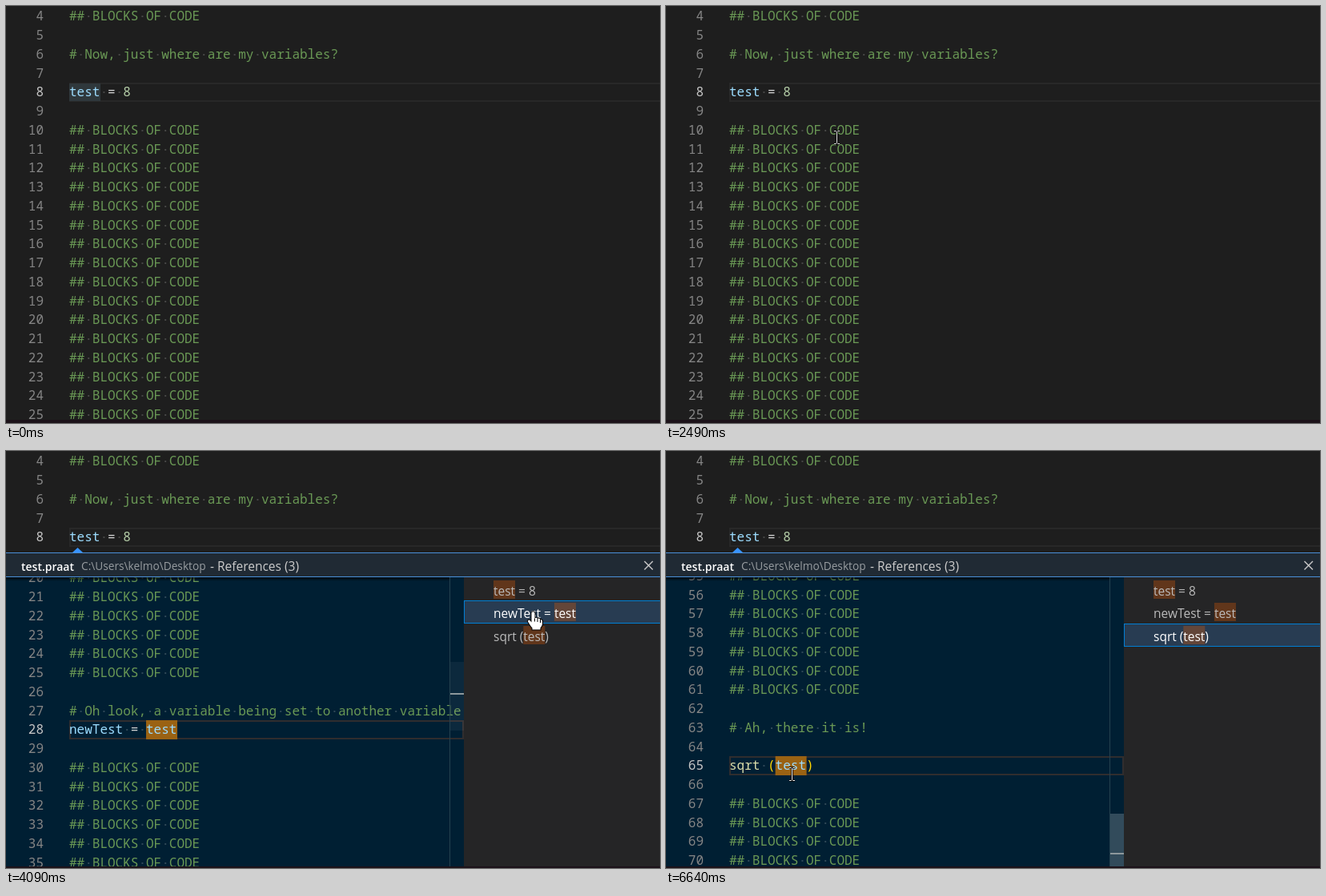
Recreate the animation shown at these times as an HTML page with a canvas. Size 817 by 522 pixels, loop 7.65 s.

```html
<!DOCTYPE html>
<html lang="en">
<head>
<meta charset="utf-8">
<title>Peek references</title>
<style>
html, body { margin: 0; width: 100%; height: 100%; overflow: hidden; background: #1e1e1e; }
canvas { display: block; }
</style>
</head>
<body>
<canvas id="stage" width="817" height="522"></canvas>
<script>
const ctx = document.getElementById('stage').getContext('2d');
const W = 817, H = 522, LOOP = 7650;
const LINE = 23.75, CHAR = 9.6, LEFT = 79;
const MONO = '16px "Noto Sans Mono", monospace';
const UI = '"Open Sans", "Noto Sans", sans-serif';
const GREEN = '#6a9955', BLUE = '#9cdcfe', GREY = '#d4d4d4', GOLD = '#ffd700';

const rect = (color, x, y, w, h) => { ctx.fillStyle = color; ctx.fillRect(x, y, w, h); };

function text(str, x, y, color, font, align = 'left') {
  ctx.font = font;
  ctx.fillStyle = color;
  ctx.textAlign = align;
  ctx.fillText(str, x, y);
}

function line(color, width, ...pts) {
  ctx.strokeStyle = color;
  ctx.lineWidth = width;
  ctx.beginPath();
  for (let i = 0; i < pts.length; i += 2) ctx.lineTo(pts[i], pts[i + 1]);
  ctx.stroke();
}

// ---- code document: each line is a list of [text, colour] tokens ----
const special = {
  6: [['# Now, just where are my variables?', GREEN]],
  8: [['test', BLUE], [' = ', GREY], ['8', '#b5cea8']],
  27: [['# Oh look, a variable being set to another variable', GREEN]],
  28: [['newTest', BLUE], [' = ', GREY], ['test', BLUE]],
  63: [['# Ah, there it is!', GREEN]],
  65: [['sqrt', '#dcdcaa'], [' ', GREY], ['(', GOLD], ['test', BLUE], [')', GOLD]]
};
const blank = [5, 7, 9, 26, 29, 62, 64, 66];
const block = [['## BLOCKS OF CODE', GREEN]];
const tokens = n => special[n] || (blank.includes(n) ? [] : block);

function codeLine(n, mid, active) {
  const base = Math.round(mid + 5.75);
  text(n, 47, base, active ? '#c6c6c6' : '#858585', MONO, 'right');
  let x = LEFT;
  for (const [str, color] of tokens(n)) {
    text(str, x, base, color, MONO);
    [...str].forEach((c, i) => {
      if (c === ' ') rect('rgba(227,228,226,.2)', x + i * CHAR + 4, base - 6, 2, 2);
    });
    x += str.length * CHAR;
  }
}

function currentLine(mid, right, color) {
  const y = Math.round(mid - 11.5);
  ctx.strokeStyle = color;
  ctx.lineWidth = 2;
  ctx.strokeRect(LEFT + 1, y + 1, right - LEFT, 22);
}

function mainEditor(t) {
  rect('#1e1e1e', 0, 0, W, H);
  currentLine(107.5, W + 4, '#282828');
  if (t < 1540) rect('#2f383c', LEFT, 97, 39, 22);
  for (let n = 4; n < 26; n++) codeLine(n, 12.5 + (n - 4) * LINE, n === 8);
  rect('#1c1219', 0, 518, W, 4);
}

// ---- context menu ----
const menuItems = [
  ['Go to Definition', 'F12', 133], ['Go to References', 'Shift+F12', 165], ['Peek', '', 197],
  ['Find All References', 'Shift+Alt+F12', 239], ['Change All Occurrences', 'Ctrl+F2', 281],
  ['Cut', 'Ctrl+X', 323], ['Copy', 'Ctrl+C', 355], ['Paste', 'Ctrl+V', 386],
  ['Command Palette...', 'Ctrl+Shift+P', 428]
];

function menu(y) {
  ctx.save();
  ctx.shadowColor = 'rgba(0,0,0,.55)';
  ctx.shadowBlur = 8;
  ctx.shadowOffsetY = 2;
  rect('#252526', 89, 109, 367, 343);
  ctx.restore();
  for (const [label, keys, mid] of menuItems) {
    const hot = Math.abs(y - mid) < 16;
    const color = hot ? '#fff' : '#d0d0d0';
    if (hot) rect('#094771', 89, mid - 15, 365, 29);
    text(label, 121, mid + 6, color, '15.6px ' + UI);
    text(keys, 423, mid + 6, color, '16px ' + UI, 'right');
  }
  line('#ccc', 1.3, 431, 190.5, 437, 196.5, 431, 202.5);
  for (const s of [217, 259, 301, 406]) rect('#bbb', 102, s, 339, 1);
}

// ---- peek view ----
const views = [
  { line: 8, mid: 336.75, col: 0, thumb: 159, size: 86, mark: 196 },
  { line: 28, mid: 348.5, col: 10, thumb: 264, size: 86, mark: 303 },
  { line: 65, mid: 393.5, col: 6, thumb: 454, size: 68, mark: 503 }
];
const refs = [['', ' = 8'], ['newTest = ', ''], ['sqrt (', ')']];
const BOTTOM = 520;

function thumbAlpha(t) {
  if (t < 4090) return .13;
  if (t < 4920) return .06 + .07 * Math.min(1, (t - 4090) / 480);
  return t < 5340 ? .06 : .25;
}

function peekEditor(t, view) {
  ctx.save();
  ctx.beginPath();
  ctx.rect(0, 158, 572, BOTTOM - 158);
  ctx.clip();
  rect('#001f33', 0, 158, 572, 364);
  currentLine(view.mid, 570, '#302d2e');
  rect('#9a6213', LEFT + view.col * CHAR, Math.round(view.mid - 12), 39, 24);
  const first = Math.max(1, view.line - 11);
  for (let n = first; n < first + 22; n++)
    codeLine(n, view.mid + (n - view.line) * LINE, n === view.line);
  rect('#26414f', 554, 158, 1, 364);
  rect(`rgba(200,205,210,${thumbAlpha(t)})`, 555, view.thumb, 17, view.size);
  rect('#8d989c', 555, view.mark, 17, 2);
  if (view.line > 8) {
    const g = ctx.createLinearGradient(0, 158, 0, 163);
    g.addColorStop(0, 'rgba(0,0,0,.7)');
    g.addColorStop(1, 'rgba(0,0,0,0)');
    rect(g, 0, 158, 554, 5);
  }
  ctx.restore();
}

function refList(selected, cursor) {
  const font = '15.5px ' + UI;
  rect('#252526', 572, 158, 245, BOTTOM - 158);
  refs.forEach(([before, after], i) => {
    const top = Math.floor(159 + i * 28.5), active = i === selected;
    const color = active ? '#fff' : '#bbb';
    if (active) {
      rect('#283c52', 572, top, 245, 29);
      ctx.strokeStyle = '#007fd4';
      ctx.lineWidth = 1;
      ctx.strokeRect(572.5, top + .5, 246, 28);
    } else if (cursor.x > 572 && cursor.y >= top && cursor.y < top + 29) {
      rect('#2a2d2e', 572, top, 245, 29);
    }
    ctx.font = font;
    const x = 609 + ctx.measureText(before).width, w = ctx.measureText('test').width;
    rect('rgba(234,92,0,.3)', x, top + 3, w, 23);
    text(before + 'test' + after, 609, top + 22, color, font);
  });
}

function peek(t, cursor) {
  const selected = t < 4090 ? 0 : t < 5340 ? 1 : 2;
  rect('#1e1e1e', 0, 120, W, 8);
  ctx.fillStyle = '#3794ff';
  ctx.beginPath();
  ctx.moveTo(82, 128);
  ctx.lineTo(89.5, 121);
  ctx.lineTo(97, 128);
  ctx.fill();
  rect('#202a34', 0, 127, W, 31);
  peekEditor(t, views[selected]);
  refList(selected, cursor);
  for (const y of [127, 157]) rect('#4a90d9', 0, y, W, 1);
  text('test.praat', 19, 150, '#fff', '600 14px ' + UI);
  text('C:\\Users\\kelmo\\Desktop', 94, 149, '#989da1', '13.7px ' + UI);
  text('- References (3)', 255, 150, '#ccc', '15.5px ' + UI);
  line('#c5c5c5', 1.5, 797.5, 138, 808, 148.5);
  line('#c5c5c5', 1.5, 808, 138, 797.5, 148.5);
}

// ---- mouse: start, end, steps, from, to ----
const moves = [
  [330, 940, 9, 700, 461, 92, 108],
  [1670, 2020, 5, 92, 108, 206, 145],
  [2020, 2160, 2, 206, 145, 213, 164],
  [3040, 3460, 6, 213, 164, 450, 144],
  [3460, 3810, 5, 450, 144, 658, 201],
  [5060, 5270, 3, 658, 201, 658, 229],
  [5880, 6370, 7, 658, 229, 157, 408],
  [6500, 6640, 2, 157, 408, 157, 404]
];

function mouse(t) {
  let pos = null;
  for (const [t0, t1, n, x0, y0, x1, y1] of moves) {
    if (t < t0) break;
    const p = Math.min(1, Math.floor((t - t0) / (t1 - t0) * n + 1e-6) / n);
    const e = p * p * (3 - 2 * p);
    pos = { x: x0 + (x1 - x0) * e, y: y0 + (y1 - y0) * e };
  }
  return pos;
}

const hand = new Path2D('M-2 1Q0-1.5 2 1V8Q4 6.5 5.5 8.5Q7.5 7 9 9.5Q11.5 9 11.5 12V15Q11 18 9 20V22H-1V20Q-3 18-6.5 12Q-6.5 9-4 10.5L-2 13Z');
const arrow = new Path2D('M0 0V17L4 13L7 19.5L9.5 18.3L6.7 12.2H12Z');
const beam = new Path2D('M-3.5-8H-1L0-7L1-8H3.5M0-7V7M-3.5 8H-1L0 7L1 8H3.5');

function drawMouse(t, { x, y }) {
  const open = t >= 2560;
  const onMenu = t >= 1740 && t < 2490;
  ctx.save();
  ctx.translate(Math.round(x) + .5, Math.round(y) + .5);
  if (onMenu || open && x > 572 && y > 158) {
    ctx.strokeStyle = '#000';
    ctx.lineWidth = 2;
    ctx.stroke(hand);
    ctx.fillStyle = '#fff';
    ctx.fill(hand);
    for (const [lx, ly] of [[2, 8], [5.5, 8.5], [9, 9.5]]) line('#000', 1, lx, ly, lx, ly + 4);
  } else if (open && y > 127 && y < 157) {
    ctx.strokeStyle = '#000';
    ctx.lineWidth = 1.5;
    ctx.stroke(arrow);
    ctx.fillStyle = '#fff';
    ctx.fill(arrow);
  } else {
    ctx.strokeStyle = '#000';
    ctx.lineWidth = 2.6;
    ctx.stroke(beam);
    ctx.strokeStyle = '#eee';
    ctx.lineWidth = 1;
    ctx.stroke(beam);
  }
  ctx.restore();
}

function draw(t) {
  const cursor = mouse(t);
  mainEditor(t);
  if (t >= 1540 && t < 2490) menu(t < 1740 ? 0 : cursor.y);
  if (t >= 2560) peek(t, cursor);
  if (cursor) drawMouse(t, cursor);
}

let start;
function frame(now) {
  start ??= now;
  draw((now - start) % LOOP);
  requestAnimationFrame(frame);
}
draw(0);
requestAnimationFrame(frame);
</script>
</body>
</html>
```
